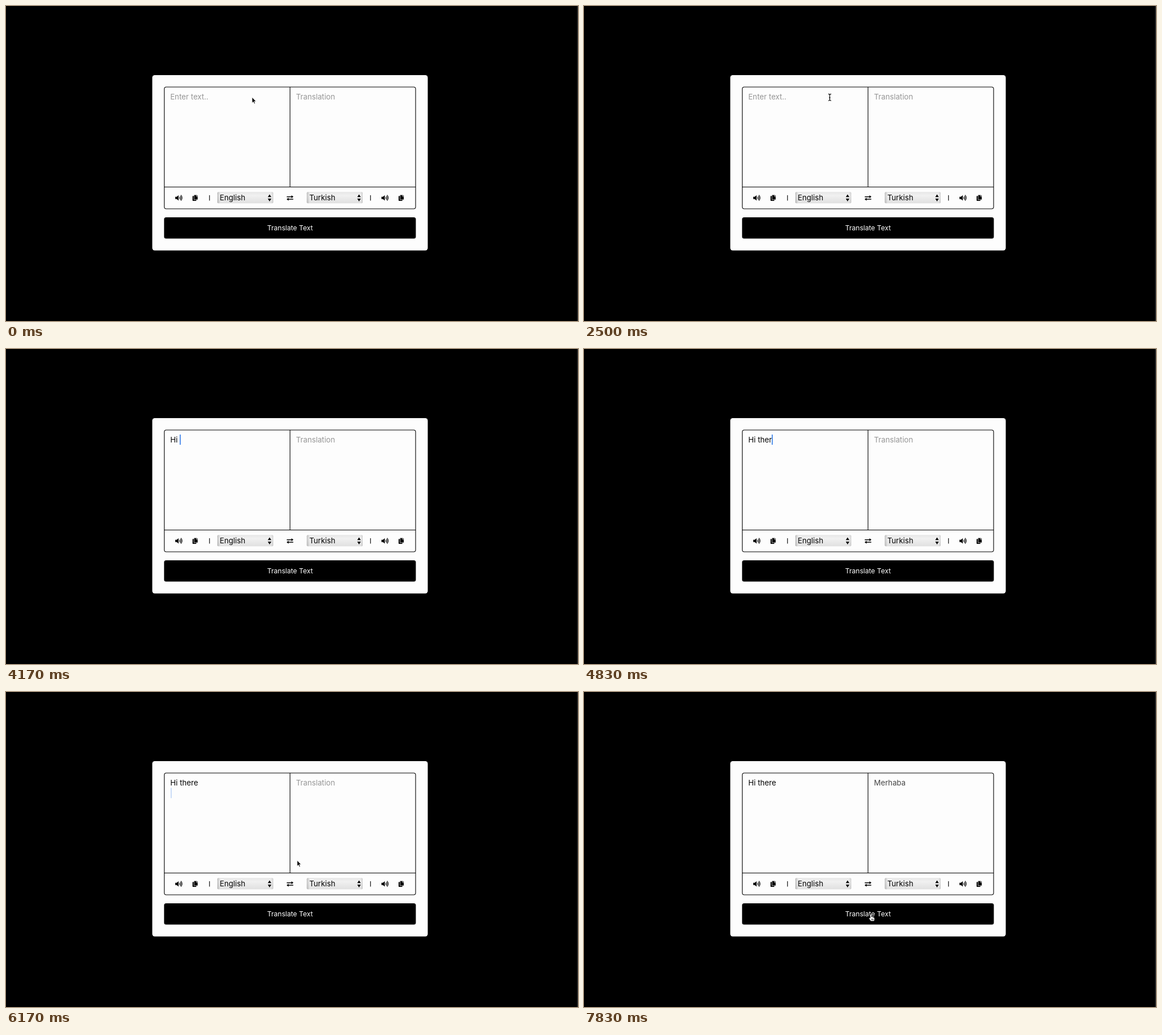
Recreate the animation shown at these times as an HTML page. Size 1007 by 556 pixels, loop 8000 ms.

```html
<!DOCTYPE html>
<html lang="en">
<head>
<meta charset="utf-8">
<title>Translator</title>
<style>
  html, body { margin: 0; height: 100%; overflow: hidden; background: #000; }
  svg { display: block; width: 1007px; height: 556px; }
  text { font: 13.2px Inter, "Open Sans", sans-serif; white-space: pre; }
  .hint { fill: #959595; }
</style>
</head>
<body>
<svg viewBox="0 0 1007 556">
  <defs>
    <linearGradient id="gloss" x2="0" y2="1">
      <stop offset="0" stop-color="#e6e6e6"/>
      <stop offset=".3" stop-color="#f1f1f1"/>
      <stop offset="1" stop-color="#e0e0e0"/>
    </linearGradient>
    <linearGradient id="edge">
      <stop offset="0" stop-color="#000" stop-opacity=".2"/>
      <stop offset=".05" stop-color="#000" stop-opacity="0"/>
      <stop offset=".96" stop-color="#000" stop-opacity="0"/>
      <stop offset="1" stop-color="#000" stop-opacity=".12"/>
    </linearGradient>
    <g id="speaker">
      <path d="M-6-2h2.6L-.2-4.7V4.7L-3.4 2H-6Z"/>
      <path d="M1.3-1.7Q2.8 0 1.3 1.7M2.6-3.4Q5.4 0 2.6 3.4M3.9-5Q8 0 3.9 5" fill="none" stroke="#000" stroke-width="1.1"/>
    </g>
    <g id="copy">
      <rect x="-4.6" y="-3.5" width="6.8" height="8.8" rx=".9"/>
      <path d="M-2-5.4H2.2V-2.8H4.8V3.2H-2Z" stroke="#fdfdfd" stroke-width=".7"/>
      <path d="M2.7-5.4L4.8-3.3H2.7Z"/>
    </g>
    <g id="select">
      <rect width="98.500" height="20" rx="2" fill="url(#gloss)"/>
      <rect width="98.500" height="20" rx="2" fill="url(#edge)"/>
      <path d="M88.900 9L92 4.300L95.100 9ZM88.900 11.700H95.100L92 16.600Z"/>
    </g>
  </defs>

  <rect x="1005.500" width="1.500" height="556" fill="#303030"/>
  <rect x="257.500" y="122" width="485" height="309.500" rx="4.500" fill="#fdfdfd"/>
  <g fill="none" stroke="#000" stroke-width="1.100">
    <rect x="278.700" y="143" width="442.400" height="215" rx="3.500"/>
    <path d="M500 143V319.500M278.700 319.500H721.100"/>
    <path d="M358.300 334V343.500M641.700 334V343.500"/>
  </g>
  <rect x="278.300" y="373" width="443.200" height="37.400" rx="3.500"/>

  <use href="#speaker" x="304" y="338.700"/>
  <use href="#copy" x="333" y="338.700"/>
  <use href="#select" x="372" y="328.300"/>
  <use href="#select" x="529.500" y="328.300"/>
  <use href="#speaker" x="667" y="338.700"/>
  <use href="#copy" x="695.800" y="338.700"/>
  <path d="M494.300 336.700H503M505.700 341H497" stroke="#000" stroke-width="1.400"/>
  <path d="M502.500 334V339.300L506 336.700ZM497.500 338.400V343.700L494 341Z"/>
  <text x="376.300" y="343.200">English</text>
  <text x="534" y="343.200">Turkish</text>
  <text x="500" y="395.800" text-anchor="middle" fill="#fff" style="font-size:12.100px">Translate Text</text>

  <text id="input" x="289.200" y="164.600"></text>
  <text id="output" x="510.600" y="164.600"></text>
  <rect id="caret" width="1.500" height="18" fill="#1f6fe5"/>

  <g id="ring" fill="none">
    <circle r="21.600" stroke="#111" stroke-width="1.200"/>
    <circle r="20.600" stroke="#aaa" stroke-width=".9"/>
  </g>
  <g id="pointers">
    <path id="arrow" d="M0 0V10.200L2.300 8L3.900 11.500L5.500 10.800L3.900 7.400H7Z" stroke="#fff" stroke-width=".7"/>
    <path id="beam" d="M-2.600-5.600Q0-5.600 0-4Q0-5.600 2.600-5.600M0-4V4.500M-2.600 6Q0 6 0 4.500Q0 6 2.600 6M-1.200.9H1.200" fill="none" stroke="#000" stroke-width="1.100"/>
    <path id="hand" d="M-1.200 5.500V.2Q-1.200-1 0-1T1.200.2V3.500Q2.500 2.600 3.200 4Q4.600 3.300 5.100 4.700Q6.500 4.500 6.500 6V8Q6.500 9.700 5.400 11.300H-.2Q-1 9.600-2.700 7.600Q-4 5.700-2.500 5.300Q-1.700 5.200-1.200 6ZM1.300 7V9.700M2.800 7V9.700M4.200 7V9.700" fill="#fff" stroke="#000" stroke-width=".7"/>
  </g>
</svg>
<script>
const $ = id => document.getElementById(id);
const input = $('input'), output = $('output'), caret = $('caret'), ring = $('ring');
const shapes = ['arrow', 'beam', 'hand'];

// each track holds [start time, value...] steps
const typing = [[0, ''], [3670, 'H'], [3830, 'Hi'], [4170, 'Hi '], [4330, 'Hi t'],
  [4500, 'Hi th'], [4670, 'Hi the'], [4830, 'Hi ther'], [5000, 'Hi there']];
const blink = [[0, 0], [2670, 1], [3170, .3], [3330, 0], [3500, .3], [3670, 1], [5500, .3],
  [5670, 1], [6170, .3], [6330, 0], [6500, .3], [6670, 1], [6830, 0]];
const pointer = [[0, 'arrow', 433.2, 161], [170, 'beam', 432.6, 161], [3670, ''],
  [6170, 'arrow', 512.6, 297.2], [6330, 'arrow', 507, 358], [6500, 'hand', 505, 393.2]];
const results = [[0, 'Translation'], [6830, 'Translating...'], [7830, 'Merhaba']];
const clicks = [[0, 0], [2670, 1, 432.6, 161], [2830, 0], [6670, 1, 505, 394.5], [6830, 0]];
const at = (track, t) => track.findLast(step => step[0] <= t).slice(1);
const place = (el, x, y) => el.setAttribute('transform', `translate(${x} ${y})`);
const show = (el, on) => el.style.display = on ? '' : 'none';

function draw(t) {
  const [typed] = at(typing, t), [result] = at(results, t);
  input.textContent = typed || 'Enter text..';
  input.setAttribute('class', typed ? '' : 'hint');
  output.textContent = result;
  output.setAttribute('fill', result === 'Merhaba' ? '#444' : '#959595');

  const newLine = t >= 5670;
  const x = typed && !newLine ? 289.2 + input.getComputedTextLength() : 290;
  place(caret, x, newLine ? 169.3 : 151);
  caret.setAttribute('opacity', at(blink, t)[0]);

  const [shape, px, py] = at(pointer, t);
  for (const id of shapes) show($(id), id === shape);
  if (shape) place($(shape), px, py);

  const [down, cx, cy] = at(clicks, t);
  show(ring, down);
  if (down) place(ring, cx, cy);
}

const start = performance.now();
function tick() {
  draw((performance.now() - start) % 8000);
  requestAnimationFrame(tick);
}
tick();
</script>
</body>
</html>
```
